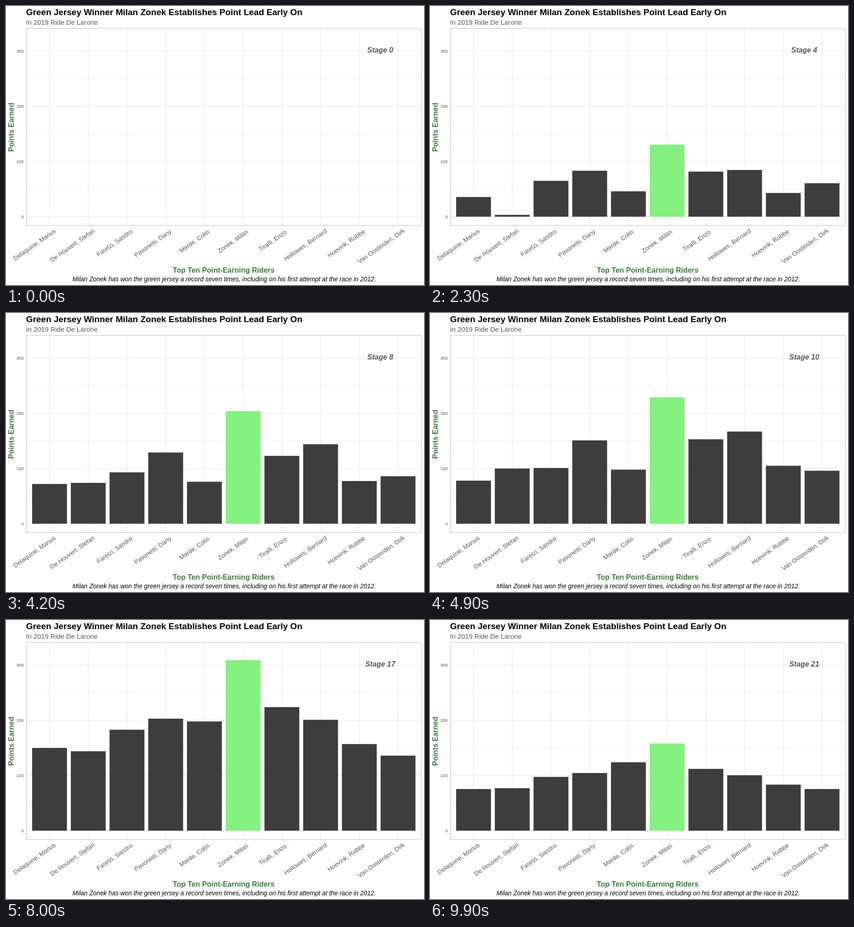
These frames come from a looping animation (917x611 px, 10 s). An HTML page:

```html
<!DOCTYPE html>
<html lang="en">
<head>
<meta charset="utf-8">
<title>Points by stage</title>
<style>
  html, body { margin: 0; width: 100%; height: 100%; overflow: hidden; background: #fff; }
  svg { display: block; font-family: "Liberation Sans", Arial, sans-serif; }
  .title { font: bold 19.15px "Liberation Sans", Arial, sans-serif; }
  .subtitle { font-size: 14.8px; fill: #595959; }
  .axis { font-size: 16px; font-weight: bold; fill: #3f7c3d; text-anchor: middle; }
  .caption { font-size: 13.8px; font-style: italic; text-anchor: end; }
  .stage { font-size: 16px; font-weight: bold; font-style: italic; fill: #595959; text-anchor: middle; }
  .tick { font-size: 9.6px; fill: #4d4d4d; text-anchor: end; }
  .rider { font-size: 13.6px; fill: #595959; }
  .major { stroke: #dedede; stroke-width: .9; }
  .minor { stroke: #dedede; stroke-width: .5; }
  .border { fill: none; stroke: #b8b8b8; }
</style>
</head>
<body>
<svg width="917" height="611" viewBox="0 0 917 611">
  <text class="title" x="44" y="20">Green Jersey Winner Milan Zonek Establishes Point Lead Early On</text>
  <text class="subtitle" x="44" y="40.5">In 2019 Ride De Larone</text>
  <g id="grid"></g>
  <g id="bars"></g>
  <rect class="border" x="44.5" y="49" width="866.5" height="431.8"/>
  <g id="labels"></g>
  <text class="stage" id="stage" x="821" y="102"></text>
  <text class="axis" x="477.5" y="584">Top Ten Point-Earning Riders</text>
  <text class="axis" transform="translate(17.3 265.5) rotate(-90)">Points Earned</text>
  <text class="caption" x="811.5" y="603">Milan Zonek has won the green jersey a record seven times, including on his first attempt at the race in 2012.</text>
</svg>
<script>
const STAGES = 22, STEP = 84.95, BAR = STEP * 0.9;
const LEADER = "Zonek, Milan";

// Running totals by stage; a gap means no points were scored there.
const riders = {
  "Delaquine, Marius": [0,,,31,,38,49,,72,,78,,,98,145,150,,,151],
  "De Houvert, Stefan": [0,,,,,5,24,,74,,100,105,,120,,,124,144,,,,154],
  "Farelzi, Sandro": [0,18,,38,45,75,,,93,,101,,119,,,,133,183,,,,195],
  "Pavonetti, Dany": [0,29,,54,66,92,,121,129,,151,167,191,,,,203,,,,,209],
  "Marde, Colin": [0,20,,,46,,,76,,,98,148,,,,,198,,,,,248],
  [LEADER]: [0,47,,76,104,144,,177,204,,229,257,277,,284,,309,,,,,316],
  "Tiralli, Enzo": [0,11,,18,77,84,,117,123,,153,184,,,,,224],
  "Hollowes, Bernard": [0,24,,59,70,92,,116,144,,167,,,,,,186,201],
  "Hoevink, Robbe": [0,7,,29,33,48,,63,69,94,105,115,132,,,,137,157,,,,167],
  "Van Oosterden, Dirk": [0,23,,42,46,68,,72,86,,96,97,103,,,,,136,151]
};

const $ = id => document.getElementById(id);
const xAt = i => 95.5 + STEP * i;
const yAt = points => 461.4 - points * 1.2083;

function add(parent, tag, attrs, text = "") {
  const el = document.createElementNS("http://www.w3.org/2000/svg", tag);
  for (const key in attrs) el.setAttribute(key, attrs[key]);
  el.textContent = text;
  return $(parent).appendChild(el);
}

for (let v = 0; v <= 300; v += 50) {
  const y = yAt(v), major = v % 100 === 0;
  add("grid", "line", { class: major ? "major" : "minor", x1: 44.5, x2: 911, y1: y, y2: y });
  if (major) add("labels", "text", { class: "tick", x: 39, y: y + 3.5 }, v);
}

const bars = Object.entries(riders).map(([name, totals], i) => {
  const x = xAt(i);
  add("grid", "line", { class: "major", x1: x, x2: x, y1: 49, y2: 480.8 });
  const label = add("labels", "text", { class: "rider", transform: `translate(${x} 493.3) rotate(-35)`, y: 9.8 }, name);
  label.setAttribute("x", -0.9 * label.getComputedTextLength());
  const rect = add("bars", "rect", {
    x: x - BAR / 2, width: BAR, fill: name === LEADER ? "#83f07f" : "#3d3d3d"
  });
  return { rect, totals };
});

function totalAt(totals, stage) {
  if (stage === STAGES) return 0;
  while (totals[stage] === undefined) stage--;
  return totals[stage];
}

// Tick at which a stage's totals are fully reached.
const arrival = stage => stage <= 13 ? 5 * stage - 1 : 4 * stage + 12;

function draw(now) {
  const tick = Math.floor(now / 100) % 100;
  let next = 1;
  while (arrival(next) <= tick) next++;
  const steps = next <= 13 ? 3 : 2;
  const progress = Math.max(0, 1 - (arrival(next) - tick) / steps);

  $("stage").textContent = `Stage ${next - 1}`;
  for (const { rect, totals } of bars) {
    const from = totalAt(totals, next - 1), to = totalAt(totals, next);
    const y = yAt(from + (to - from) * progress);
    rect.setAttribute("y", y);
    rect.setAttribute("height", yAt(0) - y);
  }
}

const start = performance.now();
function loop() {
  draw(performance.now() - start);
  requestAnimationFrame(loop);
}
loop();
</script>
</body>
</html>
```
